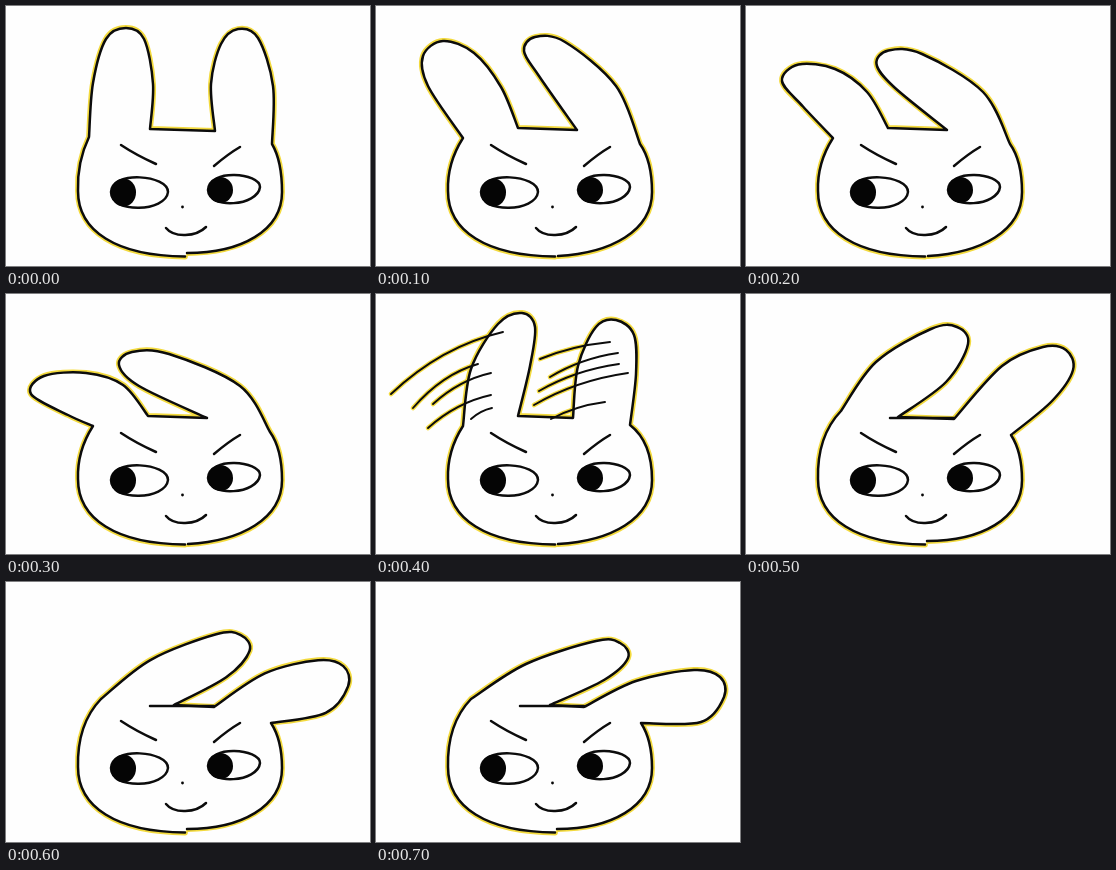
An HTML page that plays this animation: 364x260 px, repeating every 800 ms.

```html
<!DOCTYPE html>
<html lang="en">
<head>
<meta charset="utf-8">
<title>Rabbit swinging its ears</title>
<style>
html, body { margin: 0; width: 100%; height: 100%; overflow: hidden; background: #fefefe; }
svg { display: block; width: 100vw; height: 100vh; }
path { fill: none; stroke-linecap: round; stroke-linejoin: round; }
.glow { stroke: #f3da3e; stroke-width: 5.8; }
.ink { stroke: #0c0c0c; stroke-width: 2.5; }
.swish { stroke-width: 1.9; }
.swish.glow { stroke-width: 4.6; }
.body.ink { fill: #fefefe; }
</style>
</head>
<body>
<svg viewBox="0 0 364 260" preserveAspectRatio="none">
  <path class="body glow"/>
  <path class="swish glow"/>
  <path class="body ink"/>
  <path class="swish ink"/>
  <path id="brow" class="ink" d="M144 124H208"/>
  <g class="ink">
    <path d="M115 139Q130 149 150 158M234 141Q222 148 208 160"/>
    <path d="M105 186C106 164 162 169 162 186C160 206 105 208 105 186Z"/>
    <path d="M202 184C203 162 254 167 254 181C252 200 203 204 202 184Z"/>
    <path d="M160 222C168 232 190 231 200 221"/>
  </g>
  <g fill="#050505">
    <ellipse cx="117.5" cy="186.5" rx="12.5" ry="14"/>
    <ellipse cx="214.5" cy="184" rx="12.5" ry="13"/>
    <circle cx="176.5" cy="201" r="1.4"/>
  </g>
</svg>
<script>
const all = q => document.querySelectorAll(q);

// Smooth curve through points, starting from the current one.
function spline(p) {
  let d = '';
  for (let i = 0; i < p.length - 1; i++) {
    const a = p[i - 1] || p[i], b = p[i], c = p[i + 1], e = p[i + 2] || c;
    const h = [0, 1].map(k => b[k] + (c[k] - a[k]) / 6);
    const j = [0, 1].map(k => c[k] - (e[k] - b[k]) / 6);
    d += `C${h} ${j} ${c}`;
  }
  return d;
}

const pairs = n => n.flatMap((x, i) => i % 2 ? [] : [[x, n[i + 1]]]);
const mixEar = (a, b, t) => a.map((p, i) => p.map((v, k) => v + (b[i][k] - v) * t));
const mix = (a, b, t) => a.map((ear, i) => mixEar(ear, b[i], t));

// Where each ear leaves the head: left ear a to b, right ear c to d.
const upright = { a: [83, 131], b: [144, 123], c: [209, 125], d: [266, 138] };
const bent = { a: [87, 132], b: [142, 122], c: [201, 124], d: [264, 138] };
const lean = { a: [95, 117], b: [152, 123], c: [208, 125], d: [265, 141] };

const pose = (root, left, right) => [
  [root.a, ...pairs(left), root.b],
  [root.c, ...pairs(right), root.d]
];

const up = pose(upright,
  [87, 77, 100, 33, 120, 22, 138, 33, 147, 78],
  [205, 78, 215, 38, 232, 23, 252, 32, 267, 80]);
const left = pose(bent,
  [52, 80, 47, 50, 67, 35, 98, 47, 125, 81],
  [163, 70, 148, 45, 159, 31, 189, 36, 240, 80]);
const farLeft = pose(bent,
  [62, 121, 25, 100, 38, 82, 80, 79, 117, 91],
  [133, 92, 113, 71, 126, 58, 163, 60, 234, 92]);
const whip = pose({ ...bent, c: [197, 124], d: [254, 131] },
  [95, 75, 122, 30, 146, 19, 159, 33, 154, 72],
  [202, 72, 220, 33, 240, 26, 258, 41, 260, 80]);
const right = pose(lean,
  [130, 68, 185, 35, 211, 33, 222, 50, 200, 88],
  [256, 72, 297, 53, 320, 56, 327, 76, 306, 107]);
const farRight = pose({ ...lean, b: [174, 123] },
  [150, 82, 220, 59, 244, 61, 252, 76, 228, 98],
  [260, 99, 318, 88, 344, 95, 348, 115, 325, 140]);

const poses = [up, left, mix(left, farLeft, .5), farLeft, whip,
  right, mix(right, farRight, .72), farRight];

function outline([l, r], step) {
  const a = l[0], d = r[r.length - 1];
  const chin = step > 0 && step < 5 ? '182 250' : '181 247';
  return `M179 250.5C110 250 72 225 72 185Q71 ${a[1] + 25} ${a}${spline(l)}` +
    `L${r[0]}${spline(r)}Q276 ${d[1] + 17} 276 186C276 225 235 247 ${chin}`;
}

const arc = (x, y, u, v) =>
  `M${x} ${y}Q${x + (u - x) * .45} ${y + (v - y) * .77} ${u} ${v}`;
const lines = [
  arc(15, 100, 127, 38), arc(37, 114, 102, 70), arc(57, 110, 115, 79),
  arc(52, 134, 115, 101), arc(95, 125, 116, 114),
  arc(164, 65, 234, 48), arc(174, 83, 242, 59), arc(163, 97, 243, 70),
  arc(158, 111, 252, 79), arc(175, 125, 229, 108)
].join('');

const paths = poses.map(outline);
const bodies = all('.body'), swishes = all('.swish'), brow = all('#brow')[0];
swishes.forEach(s => s.setAttribute('d', lines));

function draw() {
  const step = Math.floor(performance.now() % 800 / 100);
  bodies.forEach(b => b.setAttribute('d', paths[step]));
  swishes.forEach(s => s.style.display = step === 4 ? '' : 'none');
  brow.style.display = step > 4 ? '' : 'none';
  requestAnimationFrame(draw);
}
draw();
</script>
</body>
</html>
```
